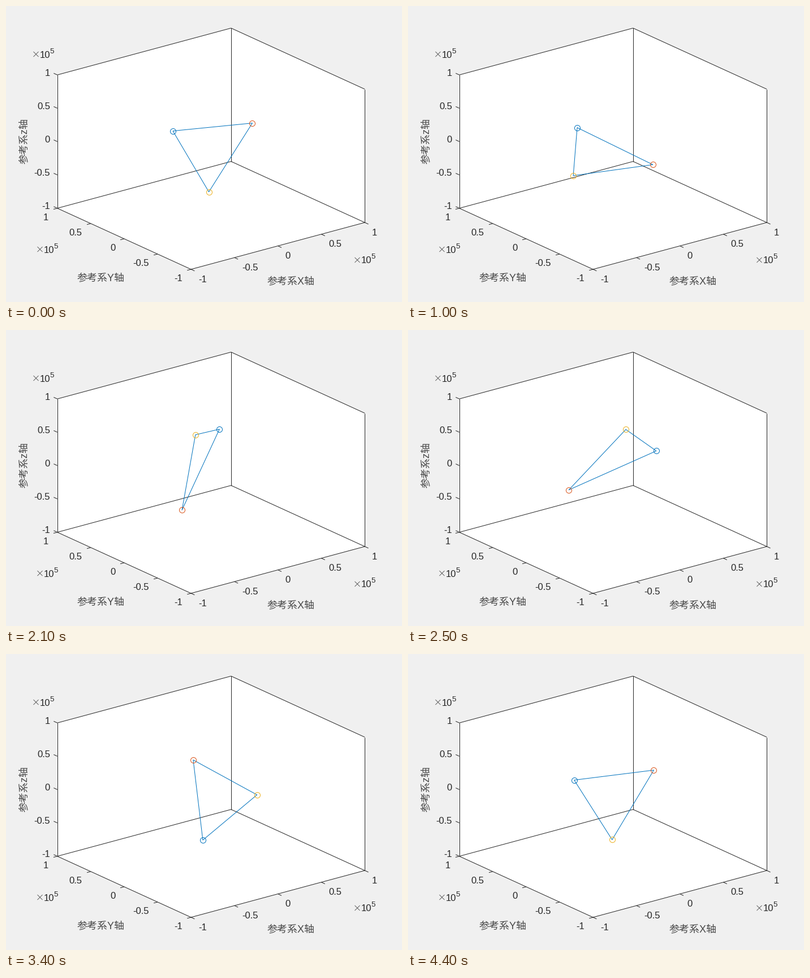
These frames come from a looping animation (700x525 px, 4.5 s). A matplotlib script:

```python
import numpy as np
import matplotlib.pyplot as plt
from matplotlib.animation import FuncAnimation

W, H, DPI = 700, 525, 100
FRAMES, INTERVAL = 45, 100
INK = "#262626"
BLUE, RED, YELLOW = "#0072BD", "#D95319", "#EDB120"
PX = 72 / DPI
END = 358.4  # degrees covered in one loop

plt.rcParams["font.family"] = ["Liberation Sans", "Noto Sans CJK JP"]

fig = plt.figure(figsize=(W / DPI, H / DPI), dpi=DPI, facecolor="#F0F0F0")
ax = fig.add_axes([0, 0, 1, 1])
ax.set_xlim(0, W)
ax.set_ylim(H, 0)
ax.axis("off")

# Projected unit cube: x runs right, y runs left, z runs up
ORIGIN = np.array([327.0, 467.0])
EX, EY, EZ = np.array([[307.2, -83], [-236.3, -108.3], [0, -236.5]])


def project(x, y, z):
    return ORIGIN + x * EX + y * EY + z * EZ


def line(*pts, color=INK, lw=1.0):
    return ax.plot(*np.array(pts).T, color=color, lw=lw * PX,
                   solid_capstyle="butt")[0]


def label(x, y, s, px=16.67, color=INK, **kw):
    ax.text(x, y, s, size=px * PX, color=color, va="baseline", **kw)


def draw_box():
    rim = [project(*c) for c in
           [(0, 0, 0), (1, 0, 0), (1, 0, 1), (1, 1, 1), (0, 1, 1), (0, 1, 0)]]
    ax.fill(*np.array(rim).T, color="white", lw=0)
    for a, b in zip(rim, rim[1:] + rim[:1]):
        line(a, b)
    for corner in (rim[1], rim[3], rim[5]):
        line(project(1, 1, 0), corner)


def draw_ticks():
    along_x = 7 * EX / np.hypot(*EX)
    along_y = 7 * EY / np.hypot(*EY)
    for f in np.linspace(0, 1, 5):
        s = f"{2 * f - 1:g}"
        px, py, pz = project(f, 0, 0), project(0, f, 0), project(0, 1, f)
        line(px, px - along_y)
        line(py, py - along_x)
        line(pz, pz + along_y)
        label(px[0] + 13, px[1] + 22.7, s, ha="left")
        label(py[0] - 15.3, py[1] + 21.5, s, ha="right")
        label(78, pz[1] + 1.5, s, ha="right")


def draw_scale(x, y):
    for d in (-1, 1):
        line((x - 4.5, y - 4.5 * d), (x + 4.5, y + 4.5 * d), color="#555555", lw=0.9)
    label(x + 6.5, y + 6, "10", ha="left")
    label(x + 24.5, y - 2, "5", px=13.3, ha="left")


def draw_title(x, y, axis, **kw):
    label(x, y, f"参考系{axis}轴", px=18, color="#484848", ha="center", **kw)


draw_box()
draw_ticks()
for x, y in [(53, 85.5), (60, 431.5), (621, 450.5)]:
    draw_scale(x, y)
draw_title(503.5, 493.5, "X")
draw_title(167.5, 487.5, "Y")
draw_title(37, 239, "z", rotation=90, rotation_mode="anchor")


def steady(i, first=6.6, growth=5, cap=36, outputs=4):
    """Solver steps that grow to a cap, each shown as a few even outputs."""
    n = np.arange((FRAMES - 1) // outputs)
    travelled = np.cumsum(np.minimum(first * growth ** n, cap))
    travelled = np.minimum(np.append(0, travelled), END)
    return np.interp(i, outputs * np.arange(len(n) + 1), travelled)


def late(i):
    """Slow start, fast middle, then a run with a slight swing."""
    if i < 21:
        return 67 * max(0, (i - 5) / 16) ** 2.24
    swing = 5.5 * np.sin(2 * np.pi * max(0, i - 29) / 15)
    return np.interp(i, [21, 29, 44], [67, 185, END]) + swing


def orbit(deg):
    a = np.radians(deg)
    return (363 + 80.2 * np.cos(a) - 12.9 * np.sin(a), 253 + 77.1 * np.sin(a))


CRAFT = [(204, late, BLUE), (-36, steady, RED), (84, steady, YELLOW)]
triangle = line((0, 0), (0, 0), color=BLUE)
rings = [ax.plot([], [], "o", ms=10 * PX, mfc="none", mec=c, mew=PX, snap=False)[0]
         for _, _, c in CRAFT]


def update(i):
    pts = [orbit(start + travel(i)) for start, travel, _ in CRAFT]
    for ring, (x, y) in zip(rings, pts):
        ring.set_data([x], [y])
    triangle.set_data(*zip(*pts, pts[0]))
    return [triangle, *rings]


anim = FuncAnimation(fig, update, frames=FRAMES, interval=INTERVAL,
                     repeat=True, repeat_delay=0, blit=False)
plt.show()
```
